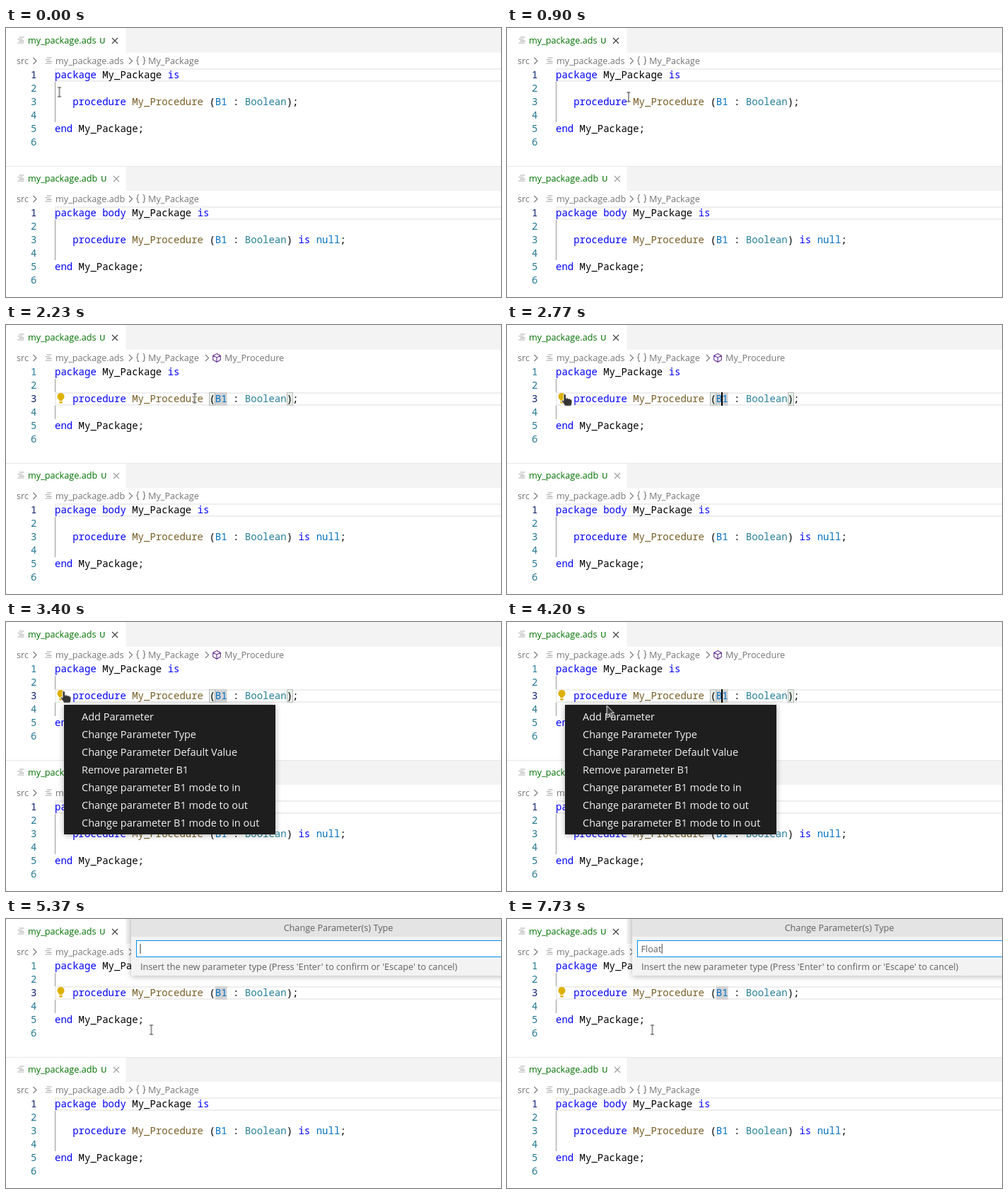
Animation of 700 by 380 pixels, one loop 8000 ms. Source, as an HTML page:

```html
<!DOCTYPE html>
<html lang="en">
<head>
<meta charset="utf-8">
<title>Change parameter type</title>
<style>
html, body { margin: 0; width: 100%; height: 100%; overflow: hidden; background: #fff; }
svg { display: block; width: 100vw; height: 100vh; }
text { font: 12.65px "Open Sans", "Noto Sans", sans-serif; }
.code > text { font: 14px "Noto Sans Mono", "DejaVu Sans Mono", monospace; fill: #000; }
.code > .nums { fill: #237893; text-anchor: end; }
.nums .on { fill: #0b216f; }
.k { fill: #00f; }
.f { fill: #795e26; }
.t { fill: #267f99; }
.c { fill: #0070c1; }
.tab text { fill: #007100; }
.tab .git { font-size: 11.5px; font-weight: 600; opacity: .85; }
.crumbs text { fill: #757575; }
.line { fill: none; stroke: #eee; stroke-width: 2; }
.icon { fill: none; stroke: #757575; stroke-width: 1.1; }
.menu text { font-size: 14.5px; fill: #f2f2f2; }
.prompt text { fill: #616161; }
.shadow { filter: drop-shadow(0 1px 4px rgba(0, 0, 0, .3)); }

/* 1% = 80 ms */
.anim { animation: 8s step-end infinite; }
.row { animation-name: row; }
.num1 { animation-name: num1; }
.num3 { animation-name: num3; }
.brackets { animation-name: brackets; }
.word { animation-name: word; }
.settled { animation-name: settled; }
.caret { animation-name: caret; }
.menu { animation-name: menu; }
.hover { animation-name: hover; }
.prompt { animation-name: prompt; }
.typing { animation-name: typing; }
.ibeam { animation-name: ibeam; }
.hand { animation-name: hand; }
.arrow { animation-name: arrow; }
.mouse { animation: mouse 8s linear infinite; }

@keyframes row { 0% { transform: none } 20.875%, 100% { transform: translateY(38px) } }
@keyframes num1 { 0% { fill: #0b216f } 20.875%, 100% { fill: #237893 } }
@keyframes num3 { 0% { fill: #237893 } 20.875%, 100% { fill: #0b216f } }
@keyframes brackets {
  0%, 62.875%, 100% { visibility: hidden }
  20.875% { visibility: visible }
}
@keyframes word { 0% { visibility: hidden } 22.5%, 100% { visibility: visible } }
@keyframes settled { 0% { visibility: hidden } 23.75%, 100% { visibility: visible } }
@keyframes caret {
  0%, 26.625%, 42.5%, 55%, 62.875%, 100% { visibility: hidden }
  20.875%, 32.875%, 48.75%, 61.25% { visibility: visible }
}
@keyframes menu {
  0%, 62.125%, 100% { visibility: hidden }
  36.625% { visibility: visible }
}
@keyframes hover {
  0% { opacity: 0; transform: none }
  52.9% { opacity: 1; transform: none }
  55.75%, 100% { opacity: 1; transform: translateY(25px) }
}
@keyframes prompt { 0% { visibility: hidden } 62.875%, 100% { visibility: visible } }
@keyframes typing {
  0% { transform: none }
  85.375% { transform: translateX(6.6px) }
  89.625% { transform: translateX(9.8px) }
  92.125% { transform: translateX(17.5px) }
  93.375% { transform: translateX(24.5px) }
  96.625%, 100% { transform: translateX(29.3px) }
}
@keyframes ibeam {
  0%, 62.125%, 100% { visibility: visible }
  33.375% { visibility: hidden }
}
@keyframes hand {
  0%, 46.5%, 100% { visibility: hidden }
  33.375% { visibility: visible }
}
@keyframes arrow {
  0%, 62.125%, 100% { visibility: hidden }
  46.5% { visibility: visible }
}
@keyframes mouse {
  0% { transform: translate(75.5px, 90.5px) }
  7.125% { transform: translate(75.5px, 90.5px); animation-timing-function: ease-in-out }
  16.25%, 17.5% { transform: translate(305px, 107px) }
  20%, 26.625% { transform: translate(301.5px, 104.5px) }
  26.625% { animation-timing-function: ease-in-out }
  34.625% { transform: translate(82px, 97.5px) }
  46.25% { transform: translate(82px, 97.5px); animation-timing-function: ease-in }
  52.5% { transform: translate(141px, 118px) }
  56.25% { transform: translate(200px, 151px); animation-timing-function: ease-out }
  57.5%, 65% { transform: translate(213px, 157px) }
  67.125%, 100% { transform: translate(205.5px, 156.5px) }
}
</style>
</head>
<body>
<svg viewBox="0 0 700 380">
  <defs>
    <path id="file" class="icon" style="stroke:#a8a8a8" d="M2 1H9M0 3.7H7M2 6.4H9M0 9H9"/>
    <path id="chevron" class="icon" d="M-2-4.5L2.5 0L-2 4.5"/>
    <path id="brace" class="icon" d="M-2-5.5q-2 0-2 2v2q0 1.5-1.6 1.5q1.6 0 1.6 1.5v2q0 2 2 2"/>
    <path id="cross" d="M-4-4L4 4M4-4L-4 4" fill="none" stroke-width="1.2"/>
    <path id="beam" fill="none" d="M-2.5-6.5H2.5M0-6.5V6.5M-2.5 6.5H2.5"/>
    <g id="chrome">
      <path fill="#f3f3f3" d="M169.5 0H700V35H169.5z"/>
      <use href="#file" x="16.5" y="12"/>
      <g class="crumbs">
        <text x="15" y="50.5">src</text>
        <use href="#chevron" x="40.5" y="46.5"/>
        <use href="#file" x="55.5" y="41"/>
        <use href="#chevron" x="176" y="46.5"/>
        <use href="#brace" x="190" y="46"/>
        <use href="#brace" transform="translate(191.5 46) scale(-1 1)"/>
        <text x="201" y="50.5">My_Package</text>
      </g>
      <path d="M69.5 76V133" stroke="#999"/>
    </g>
  </defs>

  <g class="code">
    <use href="#chrome"/>
    <g class="tab">
      <text x="31" y="21.5">my_package.ads</text>
      <text class="git" x="132" y="21.5">U</text>
      <use href="#cross" x="154" y="18" stroke="#424242"/>
    </g>
    <g class="crumbs">
      <text x="70" y="50.5">my_package.ads</text>
      <g class="anim settled">
        <use href="#chevron" x="284" y="46.5"/>
        <path class="icon" style="stroke:#652d90" d="M298 40.5l5.3 2.8v6l-5.3 3-5.3-3v-6zM292.7 43.3l5.3 2.7 5.3-2.7M298 46v6.3"/>
        <text x="309" y="50.5">My_Procedure</text>
      </g>
    </g>
    <rect class="line anim row" x="70" y="58" width="640" height="17"/>
    <rect class="anim word" x="295.8" y="95" width="16.8" height="19" fill="#d3d3d3"/>
    <path class="anim brackets" fill="#e5efe5" stroke="#b9b9b9" d="M287.5 95.5h8v18h-8zM397.5 95.5h8v18h-8z"/>
    <text class="nums"><tspan class="on anim num1" x="43.4" y="71">1</tspan><tspan x="43.4" dy="19">2</tspan><tspan class="anim num3" x="43.4" dy="19">3</tspan><tspan x="43.4" dy="19">4</tspan><tspan x="43.4" dy="19">5</tspan><tspan x="43.4" dy="19">6</tspan></text>
    <text x="69" y="71"><tspan class="k">package</tspan> My_Package <tspan class="k">is</tspan></text>
    <text x="94.2" y="109"><tspan class="k">procedure</tspan> <tspan class="f">My_Procedure</tspan> (<tspan class="c">B1</tspan> : <tspan class="t">Boolean</tspan>);</text>
    <text x="69" y="147"><tspan class="k">end</tspan> My_Package;</text>
    <rect class="anim caret" x="303" y="95" width="2" height="19"/>
    <g class="anim settled" fill="#ddb100">
      <path d="M77.5 96a5 5 0 0 1 3 9q-.8.7-.8 2h-4.4q0-1.3-.8-2a5 5 0 0 1 3-9z"/>
      <path d="M75.3 108h4.4v1.6l-1 1.2h-2.4l-1-1.2z"/>
    </g>
  </g>

  <g class="code" transform="translate(0 195)">
    <use href="#chrome"/>
    <path d="M0 .5H700" stroke="#e7e7e7"/>
    <g class="tab">
      <text x="31" y="21.5">my_package.adb</text>
      <text class="git" x="134" y="21.5">U</text>
      <use href="#cross" x="156" y="18" stroke="#a0a0a0"/>
    </g>
    <g class="crumbs"><text x="70" y="50.5">my_package.adb</text></g>
    <rect class="line" x="70" y="58" width="640" height="17"/>
    <text class="nums"><tspan class="on" x="43.4" y="71">1</tspan><tspan x="43.4" dy="19">2</tspan><tspan x="43.4" dy="19">3</tspan><tspan x="43.4" dy="19">4</tspan><tspan x="43.4" dy="19">5</tspan><tspan x="43.4" dy="19">6</tspan></text>
    <text x="69" y="71"><tspan class="k">package</tspan> <tspan class="k">body</tspan> My_Package <tspan class="k">is</tspan></text>
    <text x="94.2" y="109"><tspan class="k">procedure</tspan> <tspan class="f">My_Procedure</tspan> (<tspan class="c">B1</tspan> : <tspan class="t">Boolean</tspan>) <tspan class="k">is</tspan> <tspan class="c">null</tspan>;</text>
    <text x="69" y="147"><tspan class="k">end</tspan> My_Package;</text>
  </g>

  <g class="anim menu">
    <rect class="shadow" x="82" y="117" width="299" height="183" fill="#1e1e1e"/>
    <rect class="anim hover" x="82" y="121" width="299" height="25" fill="#3c3c3c"/>
    <text x="107" y="139">Add Parameter</text>
    <text x="107" y="164">Change Parameter Type</text>
    <text x="107" y="189">Change Parameter Default Value</text>
    <text x="107" y="214">Remove parameter B1</text>
    <text x="107" y="239">Change parameter B1 mode to in</text>
    <text x="107" y="264">Change parameter B1 mode to out</text>
    <text x="107" y="289">Change parameter B1 mode to in out</text>
  </g>

  <g class="anim prompt">
    <rect class="shadow" x="177" y="-5" width="586" height="85" fill="#f3f3f3"/>
    <rect x="177" width="586" height="25" fill="#e4e4e4"/>
    <text x="470" y="17" text-anchor="middle">Change Parameter(s) Type</text>
    <rect x="184.5" y="30.5" width="570" height="23" fill="#fff" stroke="#0090f1"/>
    <text x="189.5" y="47">Float</text>
    <g class="anim typing">
      <rect x="189.5" y="34" width="40" height="16" fill="#fff"/>
      <path d="M190 35V49" stroke="#333"/>
    </g>
    <text x="190" y="72">Insert the new parameter type (Press 'Enter' to confirm or 'Escape' to cancel)</text>
  </g>

  <g class="mouse">
    <g class="anim ibeam">
      <use href="#beam" stroke="#fff" stroke-width="2.6"/>
      <use href="#beam" stroke="#333"/>
    </g>
    <g fill="#333" stroke="#fff" stroke-linejoin="round">
      <path class="anim hand" d="M-2 1.5Q-2 0-.3 0T1.5 1.5V6Q4 5 5 6.6Q7 6 7.6 7.4Q10 7 10 9.5V13Q9.5 15 8.5 17H0Q-2 13-4.5 10.5Q-5.5 9-4 8.4Q-3 8.2-2 9.5Z"/>
      <path class="anim arrow" d="M0 0V14.5L3.4 11.4L5.8 16.8L8 15.8L5.7 10.6H10.3Z"/>
    </g>
  </g>
</svg>
</body>
</html>
```
